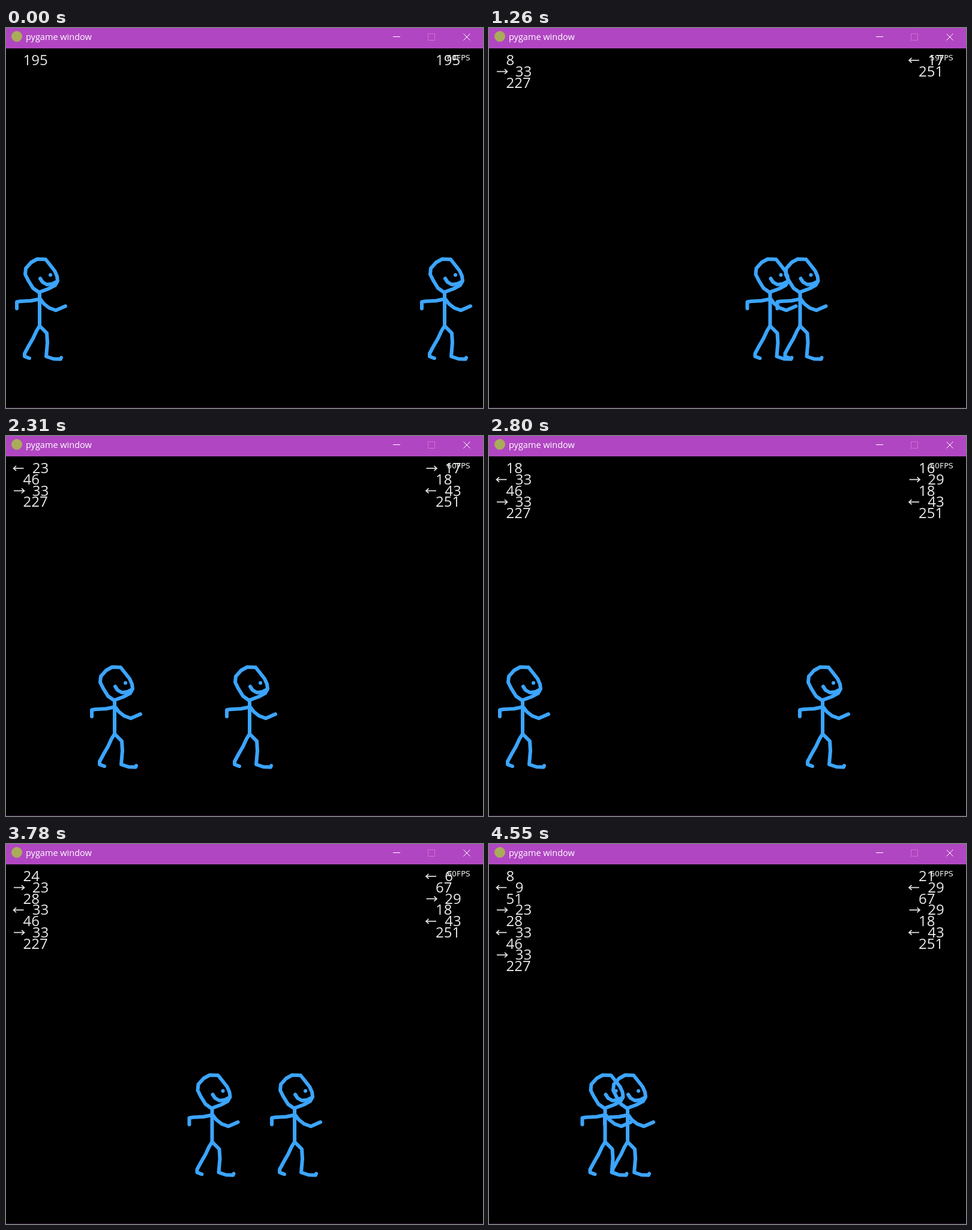
These frames come from a looping animation (795x634 px, 4.62 s). An HTML page:

```html
<!DOCTYPE html>
<html lang="en">
<head>
<meta charset="utf-8">
<title>pygame window</title>
<style>
  html, body { margin: 0; width: 100%; height: 100%; overflow: hidden; background: #000; }
  svg { display: block; width: 795px; height: 634px; font-family: "Open Sans", "Noto Sans", sans-serif; }
  .log { font-size: 24px; fill: #e8e8e8; }
  .line { fill: none; stroke: #e0e0e0; stroke-width: 1.7; }
  .man { fill: none; stroke: #3ca5ff; stroke-width: 6; stroke-linecap: round; stroke-linejoin: round; }
</style>
</head>
<body>
<svg viewBox="0 0 795 634">
  <defs>
    <g id="man" class="man">
      <path d="M55 441L45 434L37 421L32 411L33 401L42 391L52 385.5L66 386L74 396L81 405L85 414L86 422L82 429L71 435Z"/>
      <path d="M57 418L61 424L68 428L77 427L83 424M74 412h.1"/>
      <path d="M56 441V498M18 468V457L24 456L42 455L57 452L63 460L72 467L83 471L90 468L99 464"/>
      <path d="M39 551L31 548V543L38 530L45 518L51 505L56 497L68 509L69 525L67 548L79 552L91 552.5L92 550"/>
    </g>
    <path id="right" class="line" d="M13 0H30.5M26 -4L30.5 0L26 4"/>
    <path id="left" class="line" d="M29.5 0H12.5M17 -4L12.5 0L17 4"/>
  </defs>
  <rect width="795" height="634"/>
  <rect y="633" width="795" height="1" fill="#2b1030"/>
  <rect width="795" height="34" fill="#b146c2"/>
  <circle cx="18" cy="14" r="9" fill="#a9ad58"/>
  <text x="33" y="20" font-size="14.5" fill="#fff">pygame window</text>
  <g fill="none" stroke="#fff">
    <path d="M645 14.5H657M762.5 9.5L773.5 20.5M773.5 9.5L762.5 20.5"/>
    <rect x="703.5" y="9.5" width="11" height="11" stroke="#c873d5"/>
  </g>
  <use id="man0" href="#man"/>
  <use id="man1" href="#man"/>
  <g id="log0" class="log"></g>
  <g id="log1" class="log" transform="translate(687.5 0)"></g>
  <text id="fps" x="735" y="54" font-size="12.6" fill="#f0f0f0" font-family="DejaVu Sans, sans-serif"></text>
</svg>
<script>
const $ = id => document.getElementById(id);
const STEP = 70, STEPS = 66, SPEED = 12.5, ROW = 18.75;

// Each input is [direction, ticks held]
const players = [
  { x: 0, inputs: [[0, 227], [1, 33], [0, 46], [-1, 33], [0, 28], [1, 23], [0, 51], [-1, 9], [0, 99]] },
  { x: 675, inputs: [[0, 251], [-1, 43], [0, 18], [1, 29], [0, 67], [-1, 29], [0, 99]] }
];

function row([dir, held], i) {
  const arrow = dir ? `<use href="#${dir > 0 ? 'right' : 'left'}" y="${53.9 + i * ROW}"/>` : '';
  return `${arrow}<text x="${dir ? 43.7 : 28.5}" y="${62 + i * ROW}">${held}</text>`;
}

function drawPlayer({ x, inputs }, id, ticks) {
  const rows = [];
  for (const [dir, length] of inputs) {
    if (ticks <= 0) break;
    const held = Math.min(length, ticks);
    ticks -= held;
    x += dir * held * SPEED;
    rows.unshift([dir, held]);
  }
  $('man' + id).setAttribute('x', x);
  $('log' + id).innerHTML = rows.map(row).join('');
}

let shown = -1;
function draw(now) {
  const step = Math.floor(now / STEP) % STEPS;
  if (step !== shown) {
    shown = step;
    const ticks = 195 + Math.floor(step * 4.05 + 0.62);
    players.forEach((p, id) => drawPlayer(p, id, ticks));
    $('fps').textContent = (step > 5 && step < 23 ? 59 : 60) + 'FPS';
  }
  requestAnimationFrame(draw);
}
draw(0);
</script>
</body>
</html>
```
